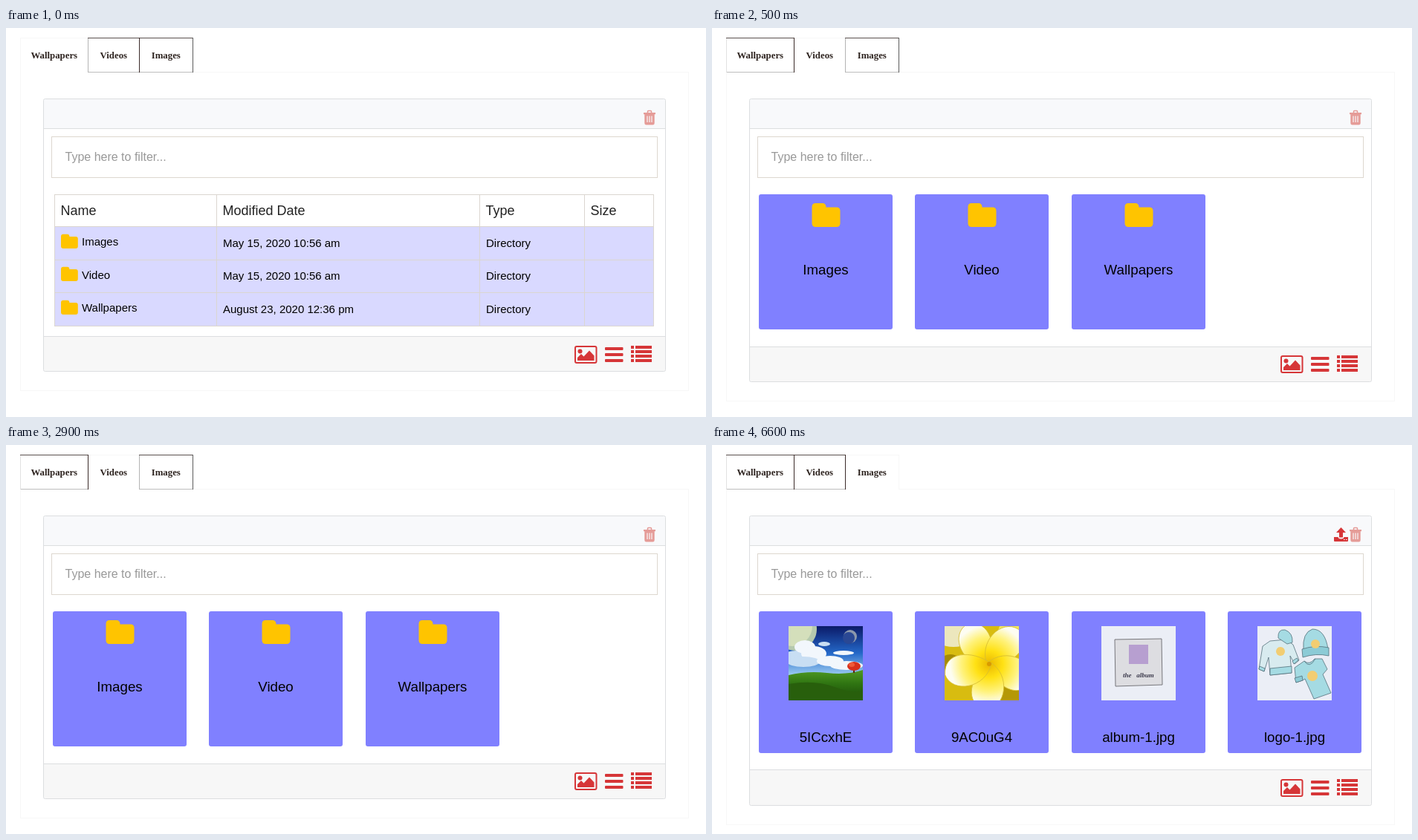
These frames come from a looping animation (942x524 px, 8 s). An HTML page:

```html
<!DOCTYPE html>
<html lang="en">
<head>
<meta charset="utf-8">
<title>File manager tabs</title>
<style>
html, body { margin: 0; width: 100%; height: 100%; overflow: hidden; background: #fff; }
svg { display: block; width: 100%; height: 100%; font-family: "Liberation Sans", Arial, sans-serif; }
.tab { font: bold 12.8px "Liberation Serif", "Times New Roman", serif; fill: #2e2420; }
</style>
</head>
<body>
<svg id="stage" viewBox="0 0 942 524" xmlns="http://www.w3.org/2000/svg">
  <defs>
    <linearGradient id="sky" x2="0" y2="1">
      <stop stop-color="#0b1a68"/><stop offset=".55" stop-color="#2468c8"/><stop offset="1" stop-color="#9cccf2"/>
    </linearGradient>
    <linearGradient id="grass" x2="0" y2="1">
      <stop stop-color="#4f9a22"/><stop offset=".45" stop-color="#2f7412"/><stop offset="1" stop-color="#1c4a08"/>
    </linearGradient>
    <radialGradient id="petal" gradientUnits="userSpaceOnUse" cx="0" cy="0" r="62">
      <stop stop-color="#eab800"/><stop offset=".3" stop-color="#ffe114"/>
      <stop offset=".6" stop-color="#fff27a"/><stop offset=".85" stop-color="#fdfdf2"/>
    </radialGradient>
    <clipPath id="thumb"><path d="M0 0h100v100H0z"/></clipPath>
    <path id="folder" fill="#ffc400" d="M5 0h9q5 0 5 5.500h14q5 0 5 5v16.500q0 5-5 5h-28q-5 0-5-5v-22q0-5 5-5z"/>
    <g id="trash">
      <path d="M5.500 3.500V1.500q0-1 1-1h3q1 0 1 1v2" fill="none" stroke="#e59c98" stroke-width="1.600"/>
      <path d="M0 3h16v2.200h-1.300V17q0 2.500-2.200 2.500h-9q-2.200 0-2.200-2.500V5.200H0z" fill="#e59c98"/>
      <path d="M5 7.500v8.500M8 7.500v8.500M11 7.500v8.500" stroke="#f8f9fa" stroke-width="1.200"/>
    </g>
    <g id="upload" fill="#d63638">
      <path d="M9.500 0l6.500 7h-4v6.500h-5V7H3z"/>
      <path d="M0 13h5.500q.5 2.500 4 2.500t4-2.500H19v5q0 1-1 1H1q-1 0-1-1z"/>
      <path d="M13 16.500h1.500M16 16.500h1.500" stroke="#fff" stroke-width="1.200"/>
    </g>
    <g id="modes" fill="#d63638">
      <rect x="766" y="429" width="28.500" height="22" rx="2" fill="none" stroke="#d63638" stroke-width="2"/>
      <circle cx="772.500" cy="435.500" r="3"/>
      <path d="M769 448v-4l5-5 3.500 3.500 7.500-8 6.500 7v6.500z"/>
      <path d="M807 430h22.500q1 0 1 1v2q0 1-1 1H807q-1 0-1-1v-2q0-1 1-1zm0 8h22.500q1 0 1 1v2q0 1-1 1H807q-1 0-1-1v-2q0-1 1-1zm0 8h22.500q1 0 1 1v2q0 1-1 1H807q-1 0-1-1v-2q0-1 1-1z"/>
      <path d="M841 428h4v4h-4zm6 0h22v4h-22zM841 434h4v4h-4zm6 0h22v4h-22zM841 440h4v4h-4zm6 0h22v4h-22zM841 446h4v4h-4zm6 0h22v4h-22z"/>
    </g>
  </defs>
  <g id="view"></g>
</svg>
<script>
const LOOP = 8000;
const view = document.getElementById('view');
const TABS = [['Wallpapers', 19, 110], ['Videos', 110, 179], ['Images', 179, 251]];
const FOLDERS = ['Images', 'Video', 'Wallpapers'];
const FILES = ['5ICcxhE', '9AC0uG4', 'album-1.jpg', 'logo-1.jpg'];
const CARD_X = [63, 273, 484, 694];
const COLS = [65, 283, 637, 778, 871];
const ROWS = [224, 267, 312, 356, 401];
const LAYOUTS = [
  { start: 0, foot: 415, end: 462, outer: 488, icons: 0 },
  { start: 500, foot: 429, end: 476, outer: 502, icons: 13 },
  { start: 4500, foot: 437, end: 485, outer: 511, icons: 22 }
];

const fill = (x, y, w, h, c, rx = 0) =>
  `<rect x="${x}" y="${y}" width="${w}" height="${h}" rx="${rx}" fill="${c}"/>`;
const hline = (x1, x2, y, c) => fill(x1, y, x2 - x1 + 1, 1, c);
const vline = (x, y1, y2, c) => fill(x, y1, 1, y2 - y1 + 1, c);
const frame = (x1, y1, x2, y2, c, rx = 0) =>
  `<rect x="${x1 + .5}" y="${y1 + .5}" width="${x2 - x1}" height="${y2 - y1}" rx="${rx}" fill="none" stroke="${c}"/>`;
const text = (s, x, y, size, c = '#000', anchor = 'start') =>
  `<text x="${x}" y="${y}" font-size="${size}" fill="${c}" text-anchor="${anchor}">${s}</text>`;
const use = (id, x, y, scale = 1) =>
  `<use href="#${id}" transform="translate(${x} ${y}) scale(${scale})"/>`;
const disc = (x, y, r, c) => `<circle cx="${x}" cy="${y}" r="${r}" fill="${c}"/>`;
const oval = (x, y, rx, ry, c) => `<ellipse cx="${x}" cy="${y}" rx="${rx}" ry="${ry}" fill="${c}"/>`;
const shape = (d, c, extra = '') => `<path d="${d}" fill="${c}" ${extra}/>`;

function tabs(active) {
  let out = '';
  TABS.forEach(([, a, b], i) => {
    if (i === active) {
      out += hline(a, b, 13, '#f7f7f7') + hline(a + 1, b - 1, 59, '#fff');
      out += vline(i ? b : a, 13, 59, '#f7f7f7');
    } else {
      out += hline(a, b, 59, '#bdbdbd') + vline(a, 13, 59, i ? '#b4b4b4' : '#e2e2e2');
      out += hline(a, b, 13, '#5a504e');
    }
  });
  TABS.forEach(([label, a, b], i) => {
    if (i !== active) out += vline(b, 13, 59, i === 2 ? '#5c5c5c' : '#3a2a28');
    out += `<text class="tab" x="${(a + b) / 2 + .3}" y="41" text-anchor="middle">${label}</text>`;
  });
  return out;
}

function shell(active) {
  const { foot, end, outer, icons } = LAYOUTS[active];
  return frame(19, 59, 918, outer, '#f7f7f7') + tabs(active) +
    fill(51, 96, 836, 39, '#f8f9fb') + fill(51, foot, 836, end - foot, '#f7f7f7') +
    frame(50, 95, 887, end, '#dcdee0', 2) +
    hline(51, 886, 135, '#dcdee0') + hline(51, 886, foot, '#dcdee0') +
    frame(61, 146, 876, 201, '#ddd7cf') +
    text('Type here to filter...', 79.5, 179, 16, '#999') +
    use('trash', 858, 111) + use('modes', 0, icons);
}

function table() {
  let out = fill(65, 267, 806, 134, '#d9d9ff');
  ROWS.forEach(y => out += hline(65, 871, y, '#dbd6d0'));
  COLS.forEach(x => out += vline(x, 224, 401, '#dbd6d0'));
  ['Name', 'Modified Date', 'Type', 'Size'].forEach((s, i) =>
    out += text(s, COLS[i] + 8.5, 252, 18, '#222'));
  FOLDERS.forEach((name, i) => {
    const y = [295, 339, 384][i];
    const date = i < 2 ? 'May 15, 2020 10:56 am' : 'August 23, 2020 12:36 pm';
    out += use('folder', 74, y - 17.3, .6) + text(name, 102, y - (i === 1 ? 1 : 2), 15) +
      text(date, 292, y, 15) + text('Directory', 646, y, 15);
  });
  return out;
}

const card = (i, h, label, y, art) =>
  fill(CARD_X[i], 224, 180, h, '#8080ff', 3) + art +
  text(label, CARD_X[i] + 90, y, 18.72, '#000', 'middle');

const folderCards = () => FOLDERS.map((s, i) =>
  card(i, 182, s, 332, use('folder', CARD_X[i] + 71.5, 236))).join('');

function meadow() {
  const clouds = [[10, 40, 16, 7], [22, 28, 14, 9], [34, 37, 17, 10], [20, 48, 22, 7], [56, 47, 18, 7], [78, 53, 22, 6], [48, 24, 8, 3], [74, 36, 14, 3]];
  return fill(0, 0, 100, 66, 'url(#sky)') +
    disc(9, 4, 29, '#b5c9ae') + disc(5, 0, 27, '#d4dfbb') +
    disc(83, 14, 9, '#8c98ac') + disc(81, 16, 8, '#2a4894') +
    clouds.map((c, i) => oval(...c, i % 3 ? '#f2f7fc' : '#c8def3')).join('') +
    shape('M0 66Q25 60 52 63T100 59V100H0z', 'url(#grass)') +
    shape('M0 78Q35 72 62 82T100 86V100H0z', '#285f0c') +
    shape('M87 54h2v9h-2z', '#5a2414') + oval(88, 54, 9, 6, '#d8301c') + oval(85, 52, 4, 3, '#f05a38');
}

function flower() {
  let out = fill(0, 0, 100, 100, '#d8bc10') + oval(12, 10, 28, 18, '#ece7bd') +
    oval(92, 8, 20, 17, '#f1e65a') + oval(8, 50, 15, 12, '#a58a04') + oval(82, 92, 30, 14, '#b59805');
  out += '<g transform="translate(60 51)">';
  for (let i = 0; i < 5; i++)
    out += `<g transform="rotate(${i * 72 - 28})">` +
      shape('M0 3C-32-10-31-56-4-61C27-58 24-20 0 3z', 'url(#petal)', 'stroke="#d6bd32" stroke-width=".8"') + '</g>';
  return out + disc(0, 0, 3, '#d99a00') + '</g>';
}

function album() {
  return fill(0, 0, 100, 100, '#ebeef6') +
    shape('M18 18L81 17 82 79 19 81z', '#dddde1', 'stroke="#77777c" stroke-width="1"') +
    fill(37, 25, 26, 26, '#b79fd0') +
    '<text x="50" y="69" text-anchor="middle" font-family="Liberation Serif, serif" font-style="italic" font-weight="bold" font-size="9" fill="#3c3a4c" xml:space="preserve">the   album</text>';
}

function clothes() {
  const pen = 'stroke="#56717b" stroke-width=".8" stroke-linejoin="round"';
  const blue = '#a5dbe3';
  return fill(0, 0, 100, 100, '#ebeef6') +
    shape('M17 20L7 27 2 58 9 61 15 42 17 66 46 63 44 40 50 51 56 46 48 25 39 18z', '#d8ebef', pen) +
    shape('M28 16Q27 4 37 5Q48 9 47 22L40 24z', blue, pen) +
    shape('M17 57L46 54V63L17 66zM3 54L10 57 9 61 2 58zM49 51L55 46 53 43 47 47z', blue, pen) +
    disc(31, 34, 6, '#f2cd72') +
    shape('M62 32Q60 9 74 4Q91 4 95 31z', blue, pen) +
    shape('M60 31Q78 25 96 29L96 40Q79 36 61 42z', '#8ccbd6', pen) +
    disc(78, 24, 6, '#f2cd72') +
    shape('M63 47L50 56 52 76 61 73 64 71 76 98 99 90 88 65 94 58 87 44 77 44Q70 53 63 47z', blue, pen) +
    shape('M63 47Q70 58 78 44', 'none', pen) + shape('M50 70L60 67 61 73 52 76z', '#8ccbd6', pen) +
    disc(74, 67, 7, '#f2cd72');
}

function fileCards() {
  const art = [meadow, flower, album, clothes];
  return use('upload', 837, 111) + FILES.map((s, i) => card(i, 191, s, 400,
    `<g transform="translate(${CARD_X[i] + 40} 244)" clip-path="url(#thumb)">${art[i]()}</g>`)).join('');
}

const pages = [table, folderCards, fileCards].map((body, i) => shell(i) + body());
let shown = -1;

function render(ms) {
  const t = ms % LOOP;
  const page = LAYOUTS.filter(l => l.start <= t).length - 1;
  if (page !== shown) view.innerHTML = pages[shown = page];
}

const begin = performance.now();
function tick() {
  render(performance.now() - begin);
  requestAnimationFrame(tick);
}
tick();
</script>
</body>
</html>
```
